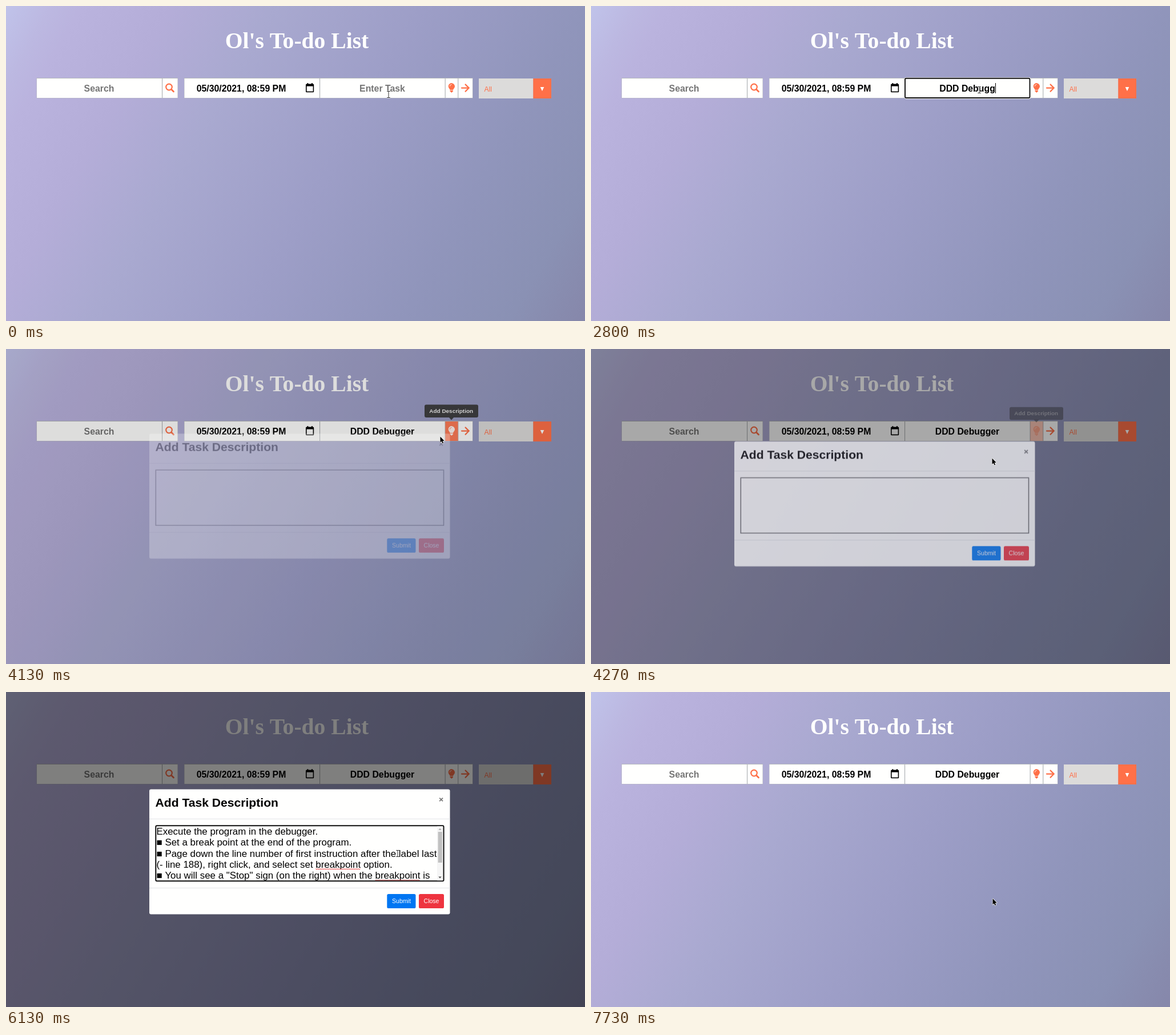
Animation of 1014x552 px, one loop 8 s. Source, as an HTML page with a canvas:

```html
<!DOCTYPE html>
<html lang="en">
<head>
<meta charset="utf-8">
<title>To-do List</title>
<style>
html, body { margin: 0; width: 100%; height: 100%; overflow: hidden; }
canvas { display: block; }
</style>
</head>
<body>
<canvas id="stage" width="1014" height="552"></canvas>
<script>
const W = 1014, H = 552, LOOP = 8000;
const ORANGE = '#ff7048', WHITE = '#fffffe', RULE = '#b5b8bc';
const SANS = '"Liberation Sans", Arial, sans-serif';
const SERIF = '"Liberation Serif", "Times New Roman", serif';
const ctx = document.getElementById('stage').getContext('2d');

const OPEN = 4043, CLOSE = 7130, BACKDROP_OUT = 7430;
const NOTE = [
  'Execute the program in the debugger.',
  '■ Set a break point at the end of the program.',
  '■ Page down the line number of first instruction after the label last',
  '(- line 188), right click, and select set breakpoint option.',
  '■ You will see a "Stop" sign (on the right) when the breakpoint is',
  'set. Alternately, you can type "break last" in the bottom window at',
  'the (gdb) prompt.'
];
const LINE = 19.25;
// time at which each number of letters of the task is reached
const TASK = 'DDD Debugger';
const KEYS = [800, 1070, 1270, 1600, 1870, 2130, 2330, 2530, 2670, 2800, 2930, 3070];
// pointer: time, x, y
const POINTER = [
  [0, 670, 155], [70, 670, 155], [600, 680, 147], [3330, 680, 147], [3720, 782, 142],
  [4070, 785, 137], [4270, 703, 191], [4450, 522, 277], [4980, 522, 277], [5330, 600, 329],
  [5720, 686, 283], [6200, 686, 283], [6520, 690, 266], [6900, 690, 266], [7120, 703, 362]
];

const clamp = v => Math.max(0, Math.min(1, v));
const span = (t, from, to) => clamp((t - from) / (to - from));
const blink = (t, from) => t >= from && (t - from) % 1000 < 500;

// cubic-bezier(0, 0, .58, 1)
function easeOut(x) {
  let lo = 0, hi = 1;
  for (let i = 0; i < 20; i++) {
    const u = (lo + hi) / 2;
    if (1.74 * u * u * (1 - u) + u ** 3 < x) lo = u; else hi = u;
  }
  return 3 * lo * lo - 2 * lo ** 3;
}

function pointerAt(t) {
  let i = 1;
  while (i < POINTER.length && POINTER[i][0] < t) i++;
  if (i === POINTER.length) return POINTER[i - 1].slice(1);
  const [t0, x0, y0] = POINTER[i - 1], [t1, x1, y1] = POINTER[i];
  const p = span(t, t0, t1);
  return [x0 + (x1 - x0) * p, y0 + (y1 - y0) * p];
}

function box(x, y, w, h, fill, r = 0) {
  ctx.fillStyle = fill;
  ctx.beginPath();
  ctx.roundRect(x, y, w, h, r);
  ctx.fill();
}

function frame(x, y, w, h, color, width, r = 0) {
  ctx.strokeStyle = color;
  ctx.lineWidth = width;
  ctx.beginPath();
  ctx.roundRect(x, y, w, h, r);
  ctx.stroke();
}

function text(str, x, y, font, color, align = 'left') {
  ctx.font = font;
  ctx.fillStyle = color;
  ctx.textAlign = align;
  ctx.fillText(str, x, y);
}

function poly(points, color) {
  ctx.fillStyle = color;
  ctx.beginPath();
  points.forEach(([x, y]) => ctx.lineTo(x, y));
  ctx.closePath();
  ctx.fill();
}

function line(points, color, width, cap = 'butt') {
  ctx.strokeStyle = color;
  ctx.lineWidth = width;
  ctx.lineCap = cap;
  ctx.beginPath();
  points.forEach(([x, y]) => ctx.lineTo(x, y));
  ctx.stroke();
}

function faded(alpha, draw) {
  if (alpha <= 0) return;
  ctx.save();
  ctx.globalAlpha = alpha;
  draw();
  ctx.restore();
}

function background() {
  const g = ctx.createLinearGradient(7, -12, 1007, 564);
  const stops = [[0, '#c0c3ea'], [.06, '#bcb8e1'], [.1, '#bab3de'], [.22, '#b4add8'], [.35, '#a9a9d0'],
    [.55, '#9d9ec7'], [.76, '#9095bb'], [.9, '#8a91b4'], [1, '#8687aa']];
  stops.forEach(([p, c]) => g.addColorStop(p, c));
  ctx.fillStyle = g;
  ctx.fillRect(0, 0, W, H);
}

function bulb(color) {
  ctx.fillStyle = color;
  ctx.beginPath();
  ctx.arc(780.3, 140.7, 5.6, Math.PI * .8, Math.PI * .2);
  ctx.quadraticCurveTo(783.3, 146, 783, 147);
  ctx.lineTo(777.6, 147);
  ctx.quadraticCurveTo(777.3, 146, 775.8, 144);
  ctx.fill();
  box(777.6, 147.7, 5.4, 2.2, color, .6);
  box(778.8, 149.5, 3, 2, color, 1);
  ctx.strokeStyle = color === ORANGE ? WHITE : ORANGE;
  ctx.lineWidth = .8;
  ctx.beginPath();
  ctx.arc(780.3, 140.7, 3.2, Math.PI, Math.PI * 1.5);
  ctx.stroke();
}

function calendar() {
  box(525, 136.5, 14.2, 14.7, '#000', 1.5);
  box(526.6, 140.6, 11, 9, WHITE);
  box(527.5, 135, 1.8, 3, '#000');
  box(535, 135, 1.8, 3, '#000');
}

function bar(t) {
  const bold = 'bold 15.84px ' + SANS, mid = 149.6;
  [[54, 246.5], [312.5, 504.5]].forEach(([x, w]) => {
    box(x - .5, 126, w + 1, 35.5, RULE);
    box(x, 127, w, 34, WHITE);
  });
  [273, 549, 768.6, 791.2].forEach(x => box(x, 127, 1.1, 34, '#a9adb1'));

  text('Search', 163, mid, bold, '#757575', 'center');
  ctx.strokeStyle = ORANGE;
  ctx.lineWidth = 2.2;
  ctx.beginPath();
  ctx.arc(285.5, 142, 5.3, 0, 7);
  ctx.stroke();
  line([[289.5, 146], [293.5, 150]], ORANGE, 2.8, 'round');

  text('05/30/2021, 08:59 PM', 333.7, mid + .2, bold, '#000');
  calendar();
  taskField(t, bold, mid);

  const hover = span(t, 3690, 3830) * (1 - span(t, 4110, 4370));
  faded(hover, () => box(769.3, 127, 22.2, 34, ORANGE));
  bulb(ORANGE);
  faded(hover, () => bulb(WHITE));
  line([[798, 143.6], [810, 143.6]], ORANGE, 2.3, 'round');
  line([[804.6, 137.5], [810.6, 143.6], [804.6, 149.7]], ORANGE, 2.3, 'round');

  box(828, 127, 95.5, 35, '#dcdbda');
  box(923.3, 127, 31.7, 35, ORANGE);
  text('All', 837.5, 149.8, '12px ' + SANS, ORANGE);
  poly([[935.7, 142], [942.3, 142], [939, 149]], WHITE);
}

function taskField(t, bold, mid) {
  const typed = TASK.slice(0, KEYS.filter(k => t >= k).length);
  const focused = t >= 330 && t < 3990;
  if (focused) {
    frame(549.5, 126, 220, 36, WHITE, 2, 3);
    frame(550, 126.8, 218.5, 34.2, '#101010', 1.9, 2);
  }
  text(typed || 'Enter Task', 659, mid, bold, typed ? '#000' : '#757575', 'center');
  if (!focused) return;
  const last = KEYS.filter(k => t >= k).pop() || 330;
  if (blink(t, last)) {
    const x = typed ? 659 + ctx.measureText(typed).width / 2 : 659;
    box(Math.round(x), 135, 1, 18, '#000');
  }
}

function tooltip(t) {
  const shown = span(t, 3720, 3960), gone = span(t, 4110, 4400);
  faded(shown * (1 - gone), () => {
    ctx.translate(0, 5 * (1 - easeOut(shown)) + 8.5 * gone);
    box(733, 97, 94, 22.5, '#383838', 3);
    poly([[775.5, 119], [784.5, 119], [780, 124]], '#383838');
    text('Add Description', 779.7, 111.6, 'bold 9.95px ' + SANS, '#fff', 'center');
  });
}

function squiggle(str, word, y) {
  const x0 = 263.5 + ctx.measureText(str.slice(0, str.indexOf(word))).width;
  const end = x0 + ctx.measureText(word).width, pts = [];
  for (let x = x0; x < end; x += 1.5) pts.push([x, y + (pts.length % 2 ? .8 : -.8)]);
  line(pts, '#e33', 1);
}

function textarea(t) {
  const focused = t >= 4670, pasted = t >= 4930;
  if (focused) frame(262.3, 234.3, 504.2, 97, '#0c0c0c', 2, 2);
  else frame(262.3, 234.3, 504.2, 97, '#6c6c6e', 1.6);
  if (!focused) return;

  ctx.save();
  ctx.beginPath();
  ctx.rect(263.3, 235.3, 502, 95);
  ctx.clip();
  if (!pasted) {
    box(264, 236, 1, 18, '#000');
    ctx.restore();
    return;
  }
  const up = span(t, 5830, 6110), scroll = 2 * LINE * (1 - up);
  const y = i => 250 + i * LINE - scroll;
  NOTE.forEach((str, i) => {
    text(str, 263.5, y(i), '16.9px ' + SANS, '#000');
    if (t >= 5870 && str.includes('breakpoint')) squiggle(str, 'breakpoint', y(i) + 2.6);
  });
  const row = t < 6670 ? 6 : 1;
  if (blink(t, t < 6670 ? 4930 : 6670)) {
    box(Math.round(263.5 + ctx.measureText(NOTE[row]).width), y(row) - 15, 1, 19, '#000');
  }

  box(755, 235, 10.3, 96, '#f5f5f5');
  box(756.6, 266 - 21 * up, 7.2, 54, '#c1c1c1');
  poly([[757.3, 241.8], [762.7, 241.8], [760, 239]], up < 1 ? '#505050' : '#a3a3a3');
  poly([[757.3, 323.6], [762.7, 323.6], [760, 326.4]], '#505050');
  ctx.restore();
}

function button(label, x, w, color) {
  box(x, 354, w, 25, color, 2.6);
  text(label, x + w / 2, 370, '10.56px ' + SANS, '#fff', 'center');
}

function paintModal(t) {
  box(251, 170.5, 526.5, 219, WHITE, 3);
  text('Add Task Description', 261.5, 201, 'bold 21.12px ' + SANS, '#000');
  line([[759.2, 185.6], [765, 191.4]], '#7b7b7b', 1.9);
  line([[765, 185.6], [759.2, 191.4]], '#7b7b7b', 1.9);
  box(251, 222, 526.5, 1, '#e3e5e8');
  box(251, 343, 526.5, 1, '#e3e5e8');
  textarea(t);
  button('Submit', 667.3, 50.2, '#0076f2');
  button('Close', 723, 44, '#ee343f');
}

// The dialog is painted on its own layer so that it fades as one sheet.
const layer = document.createElement('canvas');
layer.width = W;
layer.height = H;
const layerCtx = layer.getContext('2d');

function modal(t) {
  const alpha = span(t, OPEN, OPEN + 333) * (1 - span(t, CLOSE, CLOSE + 300));
  if (alpha <= 0) return;
  const shift = t < CLOSE
    ? easeOut(span(t, OPEN, OPEN + 412)) - 1
    : -easeOut(span(t, CLOSE, CLOSE + 412));
  layerCtx.clearRect(0, 0, W, H);
  withContext(layerCtx, () => paintModal(t));
  faded(alpha, () => ctx.drawImage(layer, 0, 33 * shift));
}

function withContext(other, draw) {
  const { fillStyle, strokeStyle } = ctx;
  const names = ['beginPath', 'roundRect', 'fill', 'stroke', 'fillText', 'lineTo', 'closePath',
    'save', 'restore', 'rect', 'clip', 'measureText'];
  const props = ['fillStyle', 'strokeStyle', 'lineWidth', 'lineCap', 'font', 'textAlign'];
  names.forEach(n => { ctx[n] = other[n].bind(other); });
  props.forEach(p => Object.defineProperty(ctx, p, {
    configurable: true, get: () => other[p], set: v => { other[p] = v; }
  }));
  draw();
  names.concat(props).forEach(n => { delete ctx[n]; });
  Object.assign(ctx, { fillStyle, strokeStyle });
}

function cursor(t) {
  const [x, y] = pointerAt(t);
  const inModal = t > OPEN && t < CLOSE;
  const overText = inModal
    ? x > 262 && x < 755 && y > 234 && y < 332
    : x > 550 && x < 769 && y > 126 && y < 162;
  if (overText) {
    [['#fff', 2.2], ['#333', 1]].forEach(([c, w]) => {
      line([[x, y - 5], [x, y + 5]], c, w);
      line([[x - 2.8, y - 5.5], [x + 2.8, y - 5.5]], c, w);
      line([[x - 2.8, y + 5.5], [x + 2.8, y + 5.5]], c, w);
    });
    return;
  }
  ctx.save();
  ctx.translate(x, y);
  const arrow = [[.5, 0], [.5, 10.5], [2.9, 8.4], [4.5, 12], [6.2, 11.2], [4.6, 7.8], [7.8, 7.6]];
  ctx.lineJoin = 'round';
  line(arrow.concat([arrow[0]]), '#fff', 1.4);
  poly(arrow, '#000');
  ctx.restore();
}

function draw(t) {
  background();
  text("Ol's To-do List", 509.5, 73.5, 'bold 39.6px ' + SERIF, WHITE, 'center');
  bar(t);
  tooltip(t);
  const dim = span(t, OPEN, OPEN + 333) * (1 - span(t, BACKDROP_OUT, 7720));
  faded(dim * .5, () => box(0, 0, W, H, '#000'));
  modal(t);
  cursor(t);
}

const start = performance.now();
function tick() {
  draw((performance.now() - start) % LOOP);
  requestAnimationFrame(tick);
}
tick();
</script>
</body>
</html>
```
